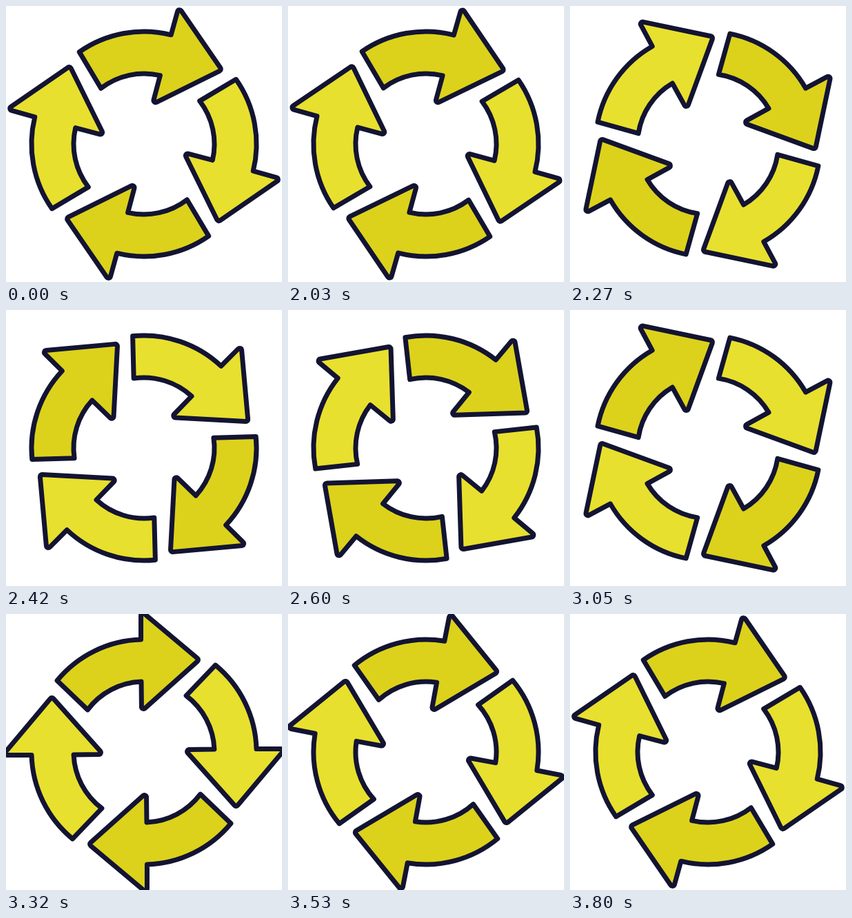
Animation, 400 px wide and 400 px high, one loop 3.83 s. Source, as an HTML page with a canvas:

```html
<!DOCTYPE html>
<html>
<head>
<meta charset="utf-8">
<style>
  html, body { margin: 0; width: 100%; height: 100%; overflow: hidden; background: #fff; }
  canvas { display: block; }
</style>
</head>
<body>
<canvas id="stage" width="400" height="400"></canvas>
<script>
const ctx = document.getElementById('stage').getContext('2d');
const LOOP = 3830, HOLD = 2000, STEP = 30, STEPS = 60;
const OUTER = 163, INNER = 102;
const rad = deg => deg * Math.PI / 180;

// Arrow around the origin, head base nearly vertical
function arrowPath() {
  const top = [-4.5, -204.5], tip = [80, -133.6], low = [-3.5, -59];
  const path = new Path2D();
  path.arc(0, 0, OUTER, rad(-140.6), Math.atan2(-163, -4.5));
  path.arcTo(...top, ...tip, 3);
  path.arcTo(...tip, ...low, 3);
  path.arcTo(...low, -4, -INNER, 3);
  path.arc(0, 0, INNER, Math.atan2(-102, -4), rad(-143.2), true);
  path.closePath();
  return path;
}
const arrow = arrowPath();

// Cubic bezier easing (.29, 0, .18, 1), solved by bisection
function ease(x) {
  if (x <= 0 || x >= 1) return x <= 0 ? 0 : 1;
  let lo = 0, hi = 1, s;
  for (let i = 0; i < 30; i++) {
    s = (lo + hi) / 2;
    const r = 1 - s;
    if (3 * r * r * s * 0.29 + 3 * r * s * s * 0.18 + s ** 3 < x) lo = s;
    else hi = s;
  }
  return s * s * (3 - 2 * s);
}

function draw(time) {
  const step = Math.max(0, Math.floor((time - HOLD) / STEP));
  ctx.setTransform(1, 0, 0, 1, 0, 0);
  ctx.fillStyle = '#fff';
  ctx.fillRect(0, 0, 400, 400);
  ctx.translate(200, 200);
  ctx.rotate(rad(15.5 + 360 * ease(step / STEPS)));
  ctx.lineWidth = 7;
  ctx.lineJoin = 'round';
  ctx.strokeStyle = '#131432';
  for (let i = 0; i < 4; i++) {
    ctx.fillStyle = i % 2 ? '#e8e02e' : '#dcd21c';
    ctx.fill(arrow);
    ctx.stroke(arrow);
    ctx.rotate(Math.PI / 2);
  }
}

const start = performance.now();
function tick() {
  draw((performance.now() - start) % LOOP);
  requestAnimationFrame(tick);
}
tick();
</script>
</body>
</html>
```
